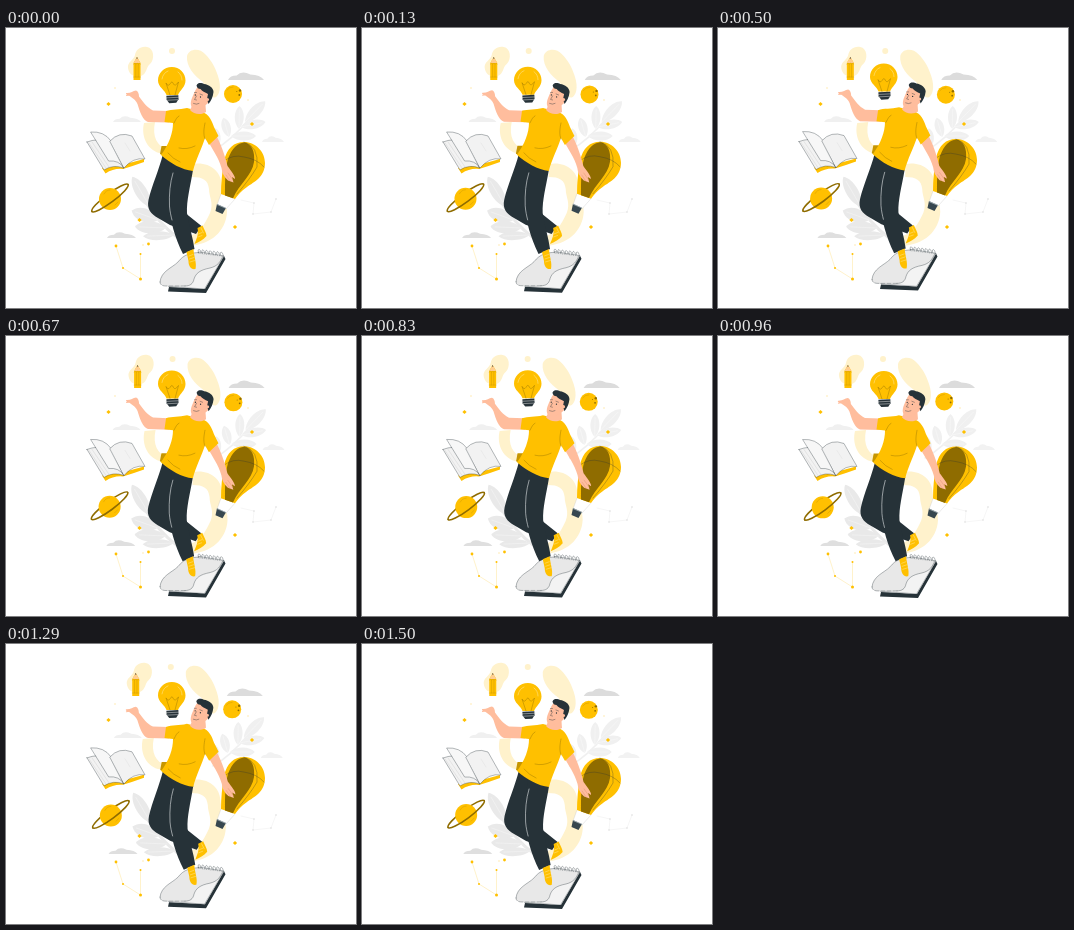
These frames come from a looping animation (350x280 px, 1.54 s). An HTML page with a canvas:

```html
<!DOCTYPE html>
<html>
<head>
<meta charset="utf-8">
<style>
html, body { margin: 0; width: 100%; height: 100%; overflow: hidden; background: #fff; }
canvas { display: block; width: 350px; height: 280px; }
</style>
</head>
<body>
<canvas id="stage"></canvas>
<script>
const LOOP = 1540;
const YELLOW = '#ffc000', DARK = '#263238', BROWN = '#8f6c00', CREAM = '#fff2cc',
      SKIN = '#ffbd9d', SHADE = '#c79600';
const canvas = document.getElementById('stage');
const ctx = canvas.getContext('2d');
const ratio = Math.max(1, window.devicePixelRatio || 1);
canvas.width = 350 * ratio;
canvas.height = 280 * ratio;

function fill(d, color) {
  ctx.fillStyle = color;
  ctx.fill(new Path2D(d));
}
function line(d, color = DARK, width = 0.5) {
  ctx.strokeStyle = color;
  ctx.lineWidth = width;
  ctx.stroke(new Path2D(d));
}
function shape(d, color, edge = DARK, width = 0.35) {
  fill(d, color);
  line(d, edge, width);
}
function disc(x, y, r, color) {
  ctx.fillStyle = color;
  ctx.beginPath();
  ctx.arc(x, y, r, 0, Math.PI * 2);
  ctx.fill();
}
function spark(x, y, r) {
  fill(`M${x} ${y - r}L${x + r} ${y}L${x} ${y + r}L${x - r} ${y}Z`, YELLOW);
}
function moved(dx, dy, draw) {
  ctx.save();
  ctx.translate(dx, dy);
  draw();
  ctx.restore();
}
function turned(x, y, angle, draw) {
  ctx.save();
  ctx.translate(x, y);
  ctx.rotate(angle);
  ctx.translate(-x, -y);
  draw();
  ctx.restore();
}

function leaf(x, y, angle, length, width, color) {
  ctx.save();
  ctx.translate(x, y);
  ctx.rotate(angle);
  fill(`M0 0C${length * .25} ${-width} ${length * .8} ${-width} ${length} 0C${length * .8} ${width} ${length * .25} ${width} 0 0Z`, color);
  line(`M0 0H${length * .85}`, '#fff', .3);
  ctx.restore();
}

function rightPlant() {
  const color = '#f0f0f0';
  line('M208 122Q226 112 244 90', color, 1.5);
  leaf(239, 94, -.8, 29, 7, color);
  leaf(233, 101, -1.55, 23, 6, color);
  leaf(223, 109, -1.85, 20, 6, color);
  leaf(235, 99, -.2, 25, 6, color);
  leaf(225, 108, 0, 25, 6, color);
  leaf(212, 118, -1.7, 18, 5, color);
}

function leftPlant() {
  const color = '#e9e9e9';
  line('M172 210Q152 195 138 171', color, 3);
  leaf(144, 179, -2.1, 35, 8, color);
  leaf(152, 192, -2.8, 28, 9, color);
  leaf(151, 188, -1.5, 27, 9, color);
  leaf(160, 200, -3.1, 31, 8, color);
  leaf(168, 207, 3.1, 31, 6, color);
}

function blobs() {
  fill('M129 27C128 32 121 34 122 40C123 47 129 50 135 48C141 46 140 39 144 36C149 31 148 20 141 19C134 18 130 22 129 27Z', CREAM);
  disc(166, 23, 3, CREAM);
  fill('M181 28C183 20 194 20 199 26C206 33 209 39 212 48C216 60 213 67 210 69C205 72 200 62 197 54C188 48 180 38 181 28Z', CREAM);
  fill('M138 95C135 107 140 121 153 125L161 126V121C151 118 146 109 149 94Z', CREAM);
  fill('M186 136C203 133 215 143 215.5 156C216 164 221 172 221 184C220 203 205 217 182 218C174 218 173 211 181 209C193 206 199 196 204 185C208 175 203 169 203 161C202 152 197 149 186 149Z', CREAM);
}

function pencil() {
  fill('M127.5 35L131 29L134.5 35V52H127.5Z', YELLOW);
  fill('M127.5 35L131 29L134.5 35Z', '#ffcd91');
  fill('M130.3 30.5L131 29L131.7 30.5Z', DARK);
  line('M127.5 36Q129 34.5 130 36Q131.3 34.5 132.3 36Q133.5 34.5 134.5 36M129.8 36V49M132.2 36V49M127.5 49H134.5', SHADE, .4);
}

function bulb() {
  fill('M152 52.5C152 45 158 39 165.8 39C173.6 39 179.5 45 179.5 52.5C179.5 59 174 62 172 67H160.5C159 62 152 59 152 52.5Z', YELLOW);
  line('M164 67L160 55Q162 59 164 56Q166 52 167.5 56Q169 59 172.5 54L169 67', BROWN, .4);
  line('M156 51Q157 45 162 43M176 52Q176 47 172 44', '#ffe28a', .6);
  turned(166, 70, -.05, () => {
    fill('M160.5 67.5H172.5V71.5L170 75H163L160.5 71.5Z', DARK);
    line('M160 69.6H173M161 72H172', '#ddd', .5);
  });
}

function orb() {
  disc(227, 66, 9, YELLOW);
  disc(234, 62.5, 1.2, BROWN);
  disc(233.3, 67, .9, BROWN);
  disc(230.8, 63.6, .5, BROWN);
  line('M221 62Q223 59 227 59', SHADE, .4);
}

function ring(start, end) {
  ctx.strokeStyle = BROWN;
  ctx.lineWidth = 1.6;
  ctx.beginPath();
  ctx.ellipse(104, 170, 22.5, 4.3, -.64, start, end);
  ctx.stroke();
}
function planet() {
  ring(Math.PI, Math.PI * 2);
  disc(104, 171, 11, YELLOW);
  ring(0, Math.PI);
  line('M98 166Q100 162 104 162M109 177L112 174', SHADE, .4);
}

function openBook() {
  fill('M96 140L99.5 145.5Q108 140 117 141Q127 138 138 134V131L116 137Z', YELLOW);
  shape('M81 114L98 142Q107 136 118 140L104 113Q91 110 81 114Z', '#f2f2f2');
  line('M83 115L100 140M86 114L103 139', '#ccc', .4);
  shape('M85 104Q98 103 105 113L118 140Q113 132 103 133Z', '#f7f7f7');
  shape('M104 113Q113 103 126 108L139 131Q127 129 118 140Z', '#f2f2f2');
  line('M119 115L124 123', '#dcdcdc', .4);
}

function balloon() {
  fill('M215 166L229 171L220 181L211 177Z', '#fff');
  line('M215 166L211 177M229 171L220 181', '#bbb', .3);
  fill('M215 166C215 155 216 145 218 133C221 120 228 114 238 114C250 114 259 124 259 135C259 149 248 154 241 159C235 163 232 167 229 171Z', YELLOW);
  fill('M219 167.5C219 154 219 141 222 131C226 120 232 115 238 114.5C246 116 249 123 248 134C246 148 233 156 227 170.3Z', BROWN);
  line('M218 133Q227 126 238 129Q251 131 258 139M238 114Q253 118 251 139Q244 151 231 166', DARK, .3);
  fill('M211 176L220 180L216.5 186L209.5 183Z', '#37474f');
  line('M211 176.5L220 180.3', '#cfd8dc', .6);
}

function notebook() {
  fill('M163 259L199 261L218 228L219.5 231L200 265L162 263.5Z', DARK);
  shape('M163 258.5L198.5 261L218 228L193 224Z', '#f3f3f3');
  fill('M193 224.5L217 228C214 234 212 238 204 240C194 242 190 245 188 251C187 256 184 258 179 258L160 258Q154 258 154 254C155 243 166 240 172 234C178 226 185 225 193 224.5Z', '#e8e8e8');
  line('M154 254C155 243 166 240 172 234C178 226 185 225 193 224.5M217 228C214 234 212 238 204 240C194 242 190 245 188 251C187 256 184 258 179 258', DARK, .35);
  ctx.setLineDash([4, 2]);
  line('M179 258H160Q154 258 154 254', DARK, .35);
  ctx.setLineDash([]);
  for (let i = 0; i < 7; i++) {
    const x = 193 + i * 3.7, y = 225.5 + i * .45;
    line(`M${x} ${y}C${x - 3} ${y - 5} ${x + 2} ${y - 6} ${x + 2} ${y}`, DARK, .35);
  }
}

function legs() {
  fill('M157 126C153 142 146 157 142.5 172C140.5 181 145 186 152 190L164 197L190 206L195.5 198L178 184L176 140Z', DARK);
  fill('M191.5 200L196.5 197.5C198 201 200.5 205 200.5 208C197 212 193 214 188.5 216C190.5 211 193 206 191.5 200Z', YELLOW);
  line('M192.5 206L196 204.5M192 209L196 207.5M195 200L197.5 205', '#fff0bd', .4);
  fill('M166 134L187 142C184 160 180.5 172 181 185C183 198 187 210 188.5 221L177 226C169 210 164 192 163 178C163 162 164 148 166 134Z', DARK);
  line('M167 145C164 155 163 166 163.5 178C164 184 165 188 166 192', '#e4e8ea', .6);
  fill('M180.5 224L187.5 221C188 229 191 235 189.5 241C185 242 182.5 238 182.5 233Z', YELLOW);
  line('M183 228L187 226.5M183.5 231L188 229.5M184 234L189 232.5', '#fff0bd', .4);
}

function torso() {
  fill('M162 83L147 82.5C141 79.5 137 74 133 68.5C133 66 132 63 130 62.5C127 63 125 65 121 65C119 65 120 67 123 67.5L127 70.5C129 72 130 73 131.5 76C134 84 136.5 92 142 94L163 94.5Z', SKIN);
  line('M120.5 67.5L126 66.5', SKIN, 1);
  fill('M202 113L210 107C214 114 219 127 221.5 138C225 143 229.5 148 229 151L226 149L227.5 154.5L222 152.5C218 149 216 145 215.5 140C212.5 129 206 121 202 113Z', SKIN);
  line('M222 145L227 152M220 147L224 153', '#d98e6f', .4);
  fill('M154 126L155.5 118L161 118L160 129Z', SHADE);
  fill('M160 83C166 81 173 82 181 80L196 84C203 86 206 93 208 99L212.5 108L203 117L199 110C196 120 190 131 187 143C176 142 164 135 155 127C163 116 167 105 167 95L158.5 94Z', YELLOW);
  line('M199 111C197 106 198 100 199 95M168 95C170 91 171 89 173 88M173 120Q181 122 189 118M162 125Q167 131 174 134', BROWN, .4);
}

function head() {
  fill('M187 76L199 70L200 84C196 87 188 87 184 82Z', SKIN);
  fill('M191.5 59C188.5 63 187.5 67 186 70C184 75 184.5 79 187.5 80.5C192 82 198 79 202 75L204 66L197 60Z', SKIN);
  fill('M190.5 57.5C192 54 196 55 198 56C203 56.5 207.5 60 207.5 64C207 69 205 73 202.5 76L201 71L202 66C199 64.5 196 63 194.5 61C192.5 61 191 60 190.5 57.5Z', DARK);
  disc(201.5, 71.5, 1.6, SKIN);
  disc(189.3, 67, .65, DARK);
  disc(194.5, 69, .65, DARK);
  line('M188.5 64.5L190.5 64.5M194 66L196.5 67M190.5 68L188.5 71.5L190.5 72M187.5 75.5Q190.5 77 193 75.5', DARK, .4);
}

function cloud(x, y, w, h, color) {
  fill(`M${x} ${y}Q${x + w * .06} ${y - h * .55} ${x + w * .24} ${y - h * .55}Q${x + w * .38} ${y - h * 1.25} ${x + w * .62} ${y - h * .7}Q${x + w * .9} ${y - h * .65} ${x + w} ${y}Z`, color);
}

function sky() {
  line('M110 218L117 240L134.5 251L134.5 226', '#ffdd7d', .4);
  line('M235 172L248 175L247 186L265 184L270 171', '#ececec', .5);
  [[110, 218, 1.4], [117, 240, 1], [134.5, 251, 1.5], [134.5, 226, 1], [142.5, 216, 1.4]]
    .forEach(([x, y, r]) => disc(x, y, r, YELLOW));
  [[102.5, 76], [246, 96], [133.5, 192], [229, 199]]
    .forEach(([x, y]) => spark(x, y, 2.1));
  [[248, 175], [247, 186], [265, 184], [270, 171]]
    .forEach(([x, y]) => disc(x, y, .8, '#dedede'));
  [[242, 72], [109, 60], [137, 217]]
    .forEach(([x, y]) => disc(x, y, .7, '#ffe49a'));
}

function render(time) {
  const phase = time % LOOP / LOOP * Math.PI * 2;
  const sway = Math.sin(phase);
  const lift = (1 - Math.cos(phase)) / 2;

  ctx.setTransform(ratio, 0, 0, ratio, 0, 0);
  ctx.fillStyle = '#fff';
  ctx.fillRect(0, 0, 350, 280);
  ctx.lineJoin = ctx.lineCap = 'round';

  moved(sway * 1.4, 0, () => {
    blobs();
    rightPlant();
    cloud(222, 52, 36, 8, '#dcdcdc');
    cloud(256, 114, 22, 6, '#f2f2f2');
  });
  moved(-sway, 0, () => {
    leftPlant();
    cloud(107, 94, 28, 6, '#f0f0f0');
  });
  moved(-sway * 1.8, 0, () => cloud(101, 210, 29, 6, '#dfdfdf'));
  sky();
  moved(sway * 1.5, 0, pencil);
  moved(sway, sway * .8, orb);
  moved(-sway, -sway * .5, planet);
  moved(0, -lift * 4.7, bulb);
  moved(0, -lift * .6, openBook);
  moved(0, -lift * 4, balloon);
  moved(0, -lift * 3.6, notebook);
  moved(0, -lift * .8, () => turned(188, 92, sway * .007, () => {
    legs();
    torso();
    head();
  }));
}

function tick() {
  render(performance.now());
  requestAnimationFrame(tick);
}
tick();
</script>
</body>
</html>
```
